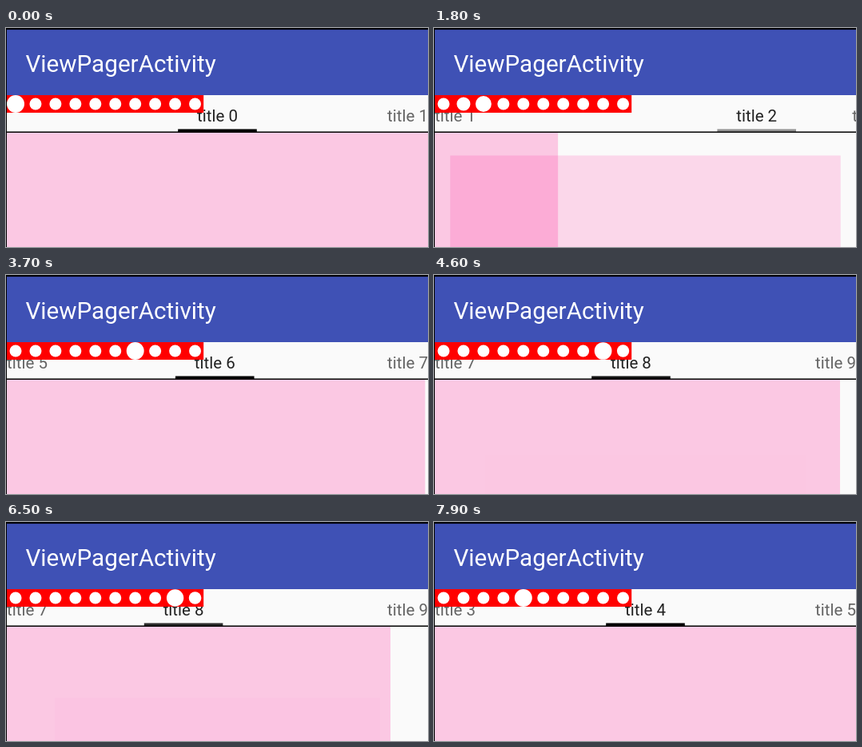
Write an HTML page that moves like this. It is 528 by 274 pixels and loops after 8.7 s.

```html
<!DOCTYPE html>
<html lang="en">
<head>
<meta charset="utf-8">
<title>Pager</title>
<style>
  html, body { margin: 0; width: 100%; height: 100%; overflow: hidden; background: #fafafa; }
  svg { display: block; width: 528px; height: 274px; }
  text { font-family: Roboto, "Open Sans", sans-serif; }
  .tab { font-size: 20.5px; text-anchor: middle; fill: #000; }
</style>
</head>
<body>
<svg id="stage" viewBox="0 0 528 274" xmlns="http://www.w3.org/2000/svg">
  <rect width="528" height="274" fill="#fafafa"/>
  <g id="pages" fill="#ff0088"></g>
  <g id="tabs"></g>
  <rect x="1" y="129.5" width="527" height="1.5"/>
  <g id="dots"><rect x="1" y="84" width="246.2" height="22" fill="#f00"/></g>
  <rect width="528" height="84" fill="#3f51b5"/>
  <rect width="528" height="3" fill="#36459c"/>
  <rect width="528" height="2"/>
  <text x="24.5" y="54.7" font-size="29.65" fill="#fff">ViewPagerActivity</text>
  <rect width="1" height="274"/>
</svg>
<script>
const LOOP = 8700, STEP = 100, COUNT = 10;
const LEFT = 1, RIGHT = 528, WIDTH = RIGHT - LEFT;
const PAGE_TOP = 131, PAGE_HEIGHT = 780;
const TAB_WIDTH = 51, TAB_GAP = 94, TAB_PAD = 23.8;

// Swipe progress in pages at key times; every page is eased on its own.
const SWIPES = [
  [400, 0], [600, .1], [700, .1], [900, .721], [1300, 1],
  [1400, 1], [2500, 2.766], [3700, 6.0485], [4600, 8.117], [5000, 8.9],
  [5100, 8.9], [5400, 9], [5900, 9], [6500, 8.184], [7900, 4]
];

function make(tag, parent, attrs) {
  const el = document.createElementNS("http://www.w3.org/2000/svg", tag);
  document.getElementById(parent).append(el);
  return set(el, attrs);
}

function set(el, attrs) {
  for (const key in attrs) el.setAttribute(key, attrs[key]);
  return el;
}

const back = make("rect", "pages", {});
const front = make("rect", "pages", { y: PAGE_TOP, width: WIDTH, height: PAGE_HEIGHT, "fill-opacity": .2 });
const bar = make("rect", "tabs", { y: 126.5, width: TAB_WIDTH + 2 * TAB_PAD, height: 4.5 });
const tabs = [.6, .87, .6].map(alpha => make("text", "tabs", { class: "tab", y: 116.9, "fill-opacity": alpha }));
const dots = Array.from({ length: COUNT }, (_, i) =>
  make("circle", "dots", { cx: 12 + i * 24.95, cy: 95, fill: "#fff" }));

function progressAt(time) {
  const next = SWIPES.findIndex(([at]) => at > time);
  if (next === 0) return SWIPES[0][1];
  if (next < 0) return SWIPES[SWIPES.length - 1][1];
  const [t0, p0] = SWIPES[next - 1];
  const [t1, p1] = SWIPES[next];
  return p0 + (p1 - p0) * (time - t0) / (t1 - t0);
}

function positionAt(time) {
  const progress = progressAt(Math.floor(time / STEP) * STEP);
  const page = Math.floor(progress);
  const part = progress - page;
  return page + part * part * (3 - 2 * part);
}

// The leaving page slides left; the next one grows and fades in beneath it.
function drawPages(offset) {
  const scale = .75 + .25 * offset;
  set(front, { x: LEFT - offset * WIDTH });
  set(back, {
    x: LEFT + WIDTH * (1 - scale) / 2,
    y: PAGE_TOP + PAGE_HEIGHT * (1 - scale) / 2,
    width: WIDTH * scale,
    height: PAGE_HEIGHT * scale,
    "fill-opacity": .2 * offset
  });
}

function drawTabs(index, offset) {
  const half = TAB_WIDTH / 2;
  const current = offset > .5 ? index + 1 : index;
  const center = RIGHT - half - (WIDTH - TAB_WIDTH) * ((offset + .5) % 1);
  const reach = TAB_WIDTH + TAB_GAP;
  const centers = [
    Math.min(LEFT + half, center - reach),
    center,
    Math.max(RIGHT - half, center + reach)
  ];
  tabs.forEach((tab, i) => {
    const n = current + i - 1;
    tab.textContent = n >= 0 && n < COUNT ? "title " + n : "";
    set(tab, { x: centers[i] });
  });
  set(bar, { x: center - half - TAB_PAD, "fill-opacity": Math.abs(offset - .5) * 2 });
}

function draw(now) {
  const position = positionAt(now % LOOP);
  const index = Math.floor(position);
  const offset = position - index;
  drawPages(offset);
  drawTabs(index, offset);
  dots.forEach((dot, i) => set(dot, { r: 7.5 + 3.5 * Math.max(0, 1 - Math.abs(position - i)) }));
}

const begin = performance.now();
function tick() {
  draw(performance.now() - begin);
  requestAnimationFrame(tick);
}
tick();
</script>
</body>
</html>
```
